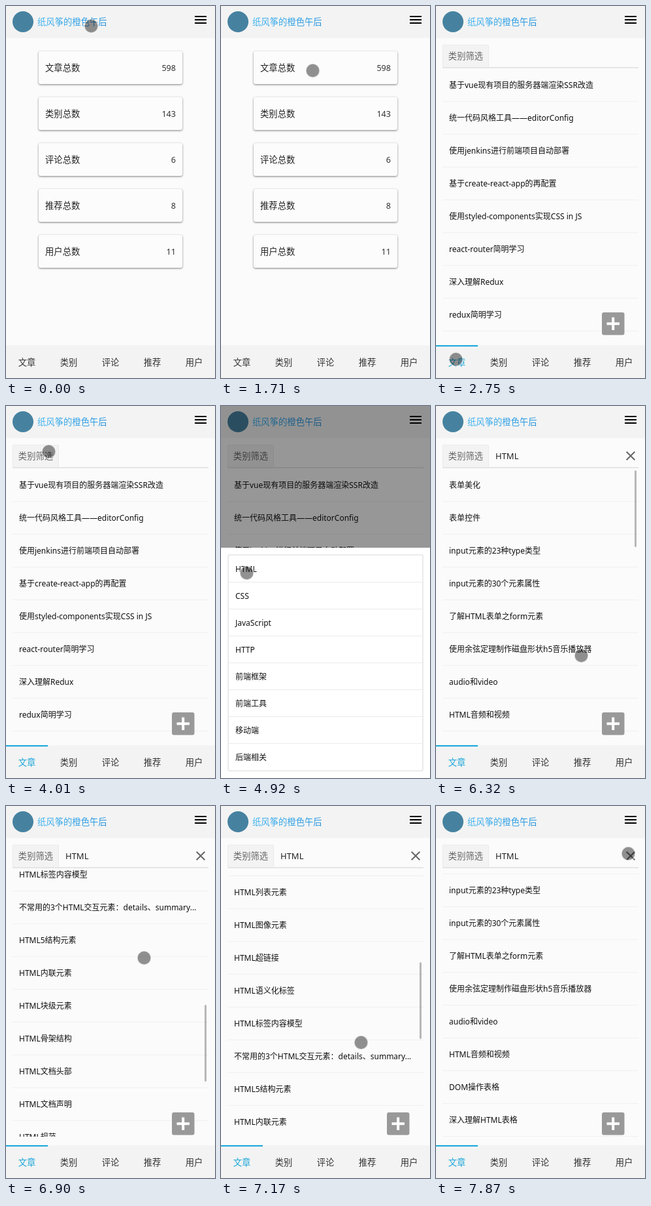
An HTML page for the animation above (8 s loop, 320 px wide and 567 px high).

```html
<!DOCTYPE html>
<html lang="zh-CN">
<head>
<meta charset="utf-8">
<title>Blog admin</title>
<style>
* { box-sizing: border-box; }
html, body { margin: 0; width: 100%; height: 100%; overflow: hidden; }
body { position: relative; background: #fbfbfb; color: #111; white-space: nowrap;
  font: 12px "Noto Sans", "Noto Sans CJK SC", "Noto Sans CJK", sans-serif; }
header, nav, .abs, .page, .sheet { position: absolute; }
header { left: 0; top: 0; width: 320px; height: 49px; background: #f3f3f3; }
.logo { left: 10px; top: 8px; width: 32px; height: 32px; border-radius: 50%; background: #4682a0; }
.title { left: 48px; top: 0; line-height: 48px; font-size: 13.33px; font-weight: 500; color: transparent;
  background: linear-gradient(90deg, #48b8f2, #2090dd); -webkit-background-clip: text; background-clip: text; }
.page { left: 0; top: 0; width: 320px; height: 517px; }
.card { display: flex; justify-content: space-between; width: 220px; height: 50px; margin: 0 50px 20px;
  padding: 0 10px; line-height: 51px; font-size: 13.33px; color: #222; background: #fcfcfc;
  border-radius: 3px; box-shadow: 0 1px 3px rgba(0,0,0,.5); }
.card b { font-weight: 400; font-size: 12.6px; color: #333; }
#home { padding-top: 69px; }
.filter { left: 10px; top: 59px; width: 71px; height: 35px; line-height: 33px; text-align: center;
  font-size: 13.33px; color: #666; background: #f3f3f3; border: 1px solid #ebebeb; border-radius: 2px 2px 0 0; }
.rule { left: 10px; top: 93px; width: 300px; height: 2px; background: #e6e6e9; }
.tag { left: 91px; top: 59px; line-height: 34px; font-size: 13px; color: #222; }
.view { left: 10px; top: 96px; width: 300px; height: 408px; overflow: hidden; }
.row { height: 50px; padding-left: 10px; line-height: 49px; border-bottom: 1px solid #f0f0f0; }
#bar { left: 304px; width: 3px; border-radius: 2px; background: rgba(0,0,0,.27); }
nav { left: 0; top: 517px; width: 320px; height: 50px; display: flex; background: #f3f3f3; }
nav span { width: 64px; line-height: 48px; text-align: center; font-size: 13.33px; color: #333;
  border-top: 2px solid transparent; }
nav .on { color: #1aa6da; border-color: #1aa6da; }
#shade { inset: 0; background: rgba(0,0,0,.4); }
.sheet { left: 0; bottom: 0; width: 320px; padding: 10px; background: #fff; }
.sheet div { border: 2px solid #ebebeb; border-radius: 3px; }
.sheet p { margin: 0; height: 41px; padding-left: 10px; line-height: 41px; border-bottom: 1px solid #ebebeb; }
.sheet p:last-child { height: 40px; border: 0; }
#dot { left: -11.5px; top: -11.5px; width: 23px; height: 23px; border-radius: 50%;
  background: rgba(0,0,0,.43) content-box; padding: 0; }
</style>
</head>
<body>
<header>
  <div class="abs logo"></div>
  <div class="abs title">纸风筝的橙色午后</div>
  <svg class="abs" style="left:286px;top:9px" width="24" height="24"><path d="M3 6h18v2H3zm0 5h18v2H3zm0 5h18v2H3z"/></svg>
</header>
<div class="page" id="home"></div>
<div class="page" id="posts">
  <div class="abs filter">类别筛选</div>
  <div class="abs rule"></div>
  <div id="chosen">
    <div class="abs tag">HTML</div>
    <svg class="abs" style="left:286px;top:64px" width="24" height="24"><path d="M5.7 5.7 18.3 18.3M18.3 5.7 5.7 18.3" stroke="#666" stroke-width="2"/></svg>
  </div>
  <div class="abs view"><div id="all"></div><div id="html"></div></div>
  <div class="abs" id="bar"></div>
  <svg class="abs" style="left:254px;top:467px" width="35" height="35"><rect width="34.5" height="34.5" rx="3" fill="#999"/><path d="M7.5 17.2h19.5M17.2 7.5V27" stroke="#fff" stroke-width="4"/></svg>
</div>
<nav></nav>
<div class="abs" id="shade"></div>
<div class="sheet" id="kinds"><div></div></div>
<div class="sheet" id="parts"><div></div></div>
<svg class="abs" id="dot" style="background:none"><circle cx="11.5" cy="11.5" r="10.5" fill="#000" fill-opacity=".43" stroke="#fff" stroke-opacity=".5" stroke-width="1.6"/></svg>
<script>
const $ = id => document.getElementById(id);
const fill = (el, items, make) => el.innerHTML = items.map(make).join('');
const row = s => `<div class="row">${s}</div>`, option = s => `<p>${s}</p>`;

const tabs = ['文章', '类别', '评论', '推荐', '用户'], totals = [598, 143, 6, 8, 11];
const nav = document.querySelector('nav');
fill(nav, tabs, s => `<span>${s}</span>`);
fill($('home'), tabs, (s, i) => `<div class="card">${s}总数<b>${totals[i]}</b></div>`);
fill($('all'), ['基于vue现有项目的服务器端渲染SSR改造', '统一代码风格工具——editorConfig',
  '使用jenkins进行前端项目自动部署', '基于create-react-app的再配置',
  '使用styled-components实现CSS in JS', 'react-router简明学习', '深入理解Redux', 'redux简明学习'], row);
fill($('html'), ['表单美化', '表单控件', 'input元素的23种type类型', 'input元素的30个元素属性',
  '了解HTML表单之form元素', '使用余弦定理制作磁盘形状h5音乐播放器', 'audio和video', 'HTML音频和视频',
  'DOM操作表格', '深入理解HTML表格', 'HTML列表元素', 'HTML图像元素', 'HTML超链接', 'HTML语义化标签',
  'HTML标签内容模型', '不常用的3个HTML交互元素：details、summary...', 'HTML5结构元素', 'HTML内联元素',
  'HTML块级元素', 'HTML骨架结构', 'HTML文档头部', 'HTML文档声明', 'HTML规范', 'HTML全局属性',
  'HTML字符编码', 'HTML实体字符', 'HTML注释', '初识HTML'], row);
fill($('kinds').firstChild, ['HTML', 'CSS', 'JavaScript', 'HTTP', '前端框架', '前端工具', '移动端', '后端相关'], option);
fill($('parts').firstChild, ['语法', '结构', '标签'], option);

// The picture only changes at these moments (ms)
const ticks = [0, 840, 990, 1140, 1450, 1580, 1710, 2240, 2630, 2750, 3280, 3430, 3570, 3720, 3860, 4010,
  4130, 4280, 4400, 4520, 4800, 4920, 5350, 5480, 5620, 5900, 6170, 6310, 6460, 6600, 6750, 6900, 7050,
  7170, 7320, 7460, 7600, 7740, 7870];

// Keys: time, x, y
const path = [[0, 130, 30], [690, 130, 30], [1140, 145, 120], [1320, 145, 120], [1710, 140, 98], [2239, 140, 98],
  [2240, 30, 538], [3140, 30, 538], [3860, 65, 69], [4130, 65, 69], [4280, 69, 170], [4520, 72, 351],
  [4680, 72, 351], [4920, 39, 254], [5350, 39, 254], [5620, 237, 253], [5900, 231, 298], [6170, 231, 298],
  [6310, 222, 380], [6750, 212, 200], [6900, 211, 231], [7170, 214, 360], [7320, 214, 360], [7600, 303, 110],
  [7870, 294, 72]];
const scrolling = [[6310, 0], [6460, 130], [6750, 570], [6900, 716], [7050, 640], [7320, 300], [7460, 180],
  [7600, 115], [7740, 92]];
const barFade = [[2500, 1], [2750, 0], [6309, 0], [6310, 1], [7600, 1], [7870, 0]];
const rise = [[4010, 0], [4280, 1], [6040, 1], [6310, 0]];

function at(keys, t) {
  const i = keys.findIndex(k => k[0] > t);
  if (i < 1) return keys.at(i).slice(1);
  const a = keys[i - 1], b = keys[i], p = (t - a[0]) / (b[0] - a[0]);
  return a.slice(1).map((v, n) => v + (b[n + 1] - v) * p);
}
const show = (id, on) => $(id).style.display = on ? '' : 'none';

function draw(now) {
  const clock = now % 8000, t = ticks.findLast(k => k <= clock);
  const posts = t >= 2240, picked = t >= 5350;
  show('home', !posts);
  show('posts', posts);
  nav.firstChild.className = posts ? 'on' : '';
  for (const id of ['chosen', 'html', 'parts']) show(id, picked);
  for (const id of ['all', 'kinds']) show(id, !picked);

  const [top] = at(scrolling, t), [up] = at(rise, t), [x, y] = at(path, t);
  $('html').style.transform = `translateY(${-Math.round(top)}px)`;
  const bar = $('bar').style;
  bar.top = 98 + top / 992 * 284 + 'px';
  bar.height = (picked ? 117 : 5) + 'px';
  bar.opacity = at(barFade, t)[0];
  $('shade').style.opacity = up;
  for (const id of ['kinds', 'parts']) $(id).style.transform = `translateY(${100 - up * 100}%)`;
  $('dot').style.transform = `translate(${x}px,${y}px)`;
  requestAnimationFrame(draw);
}
draw(0);
</script>
</body>
</html>
```
